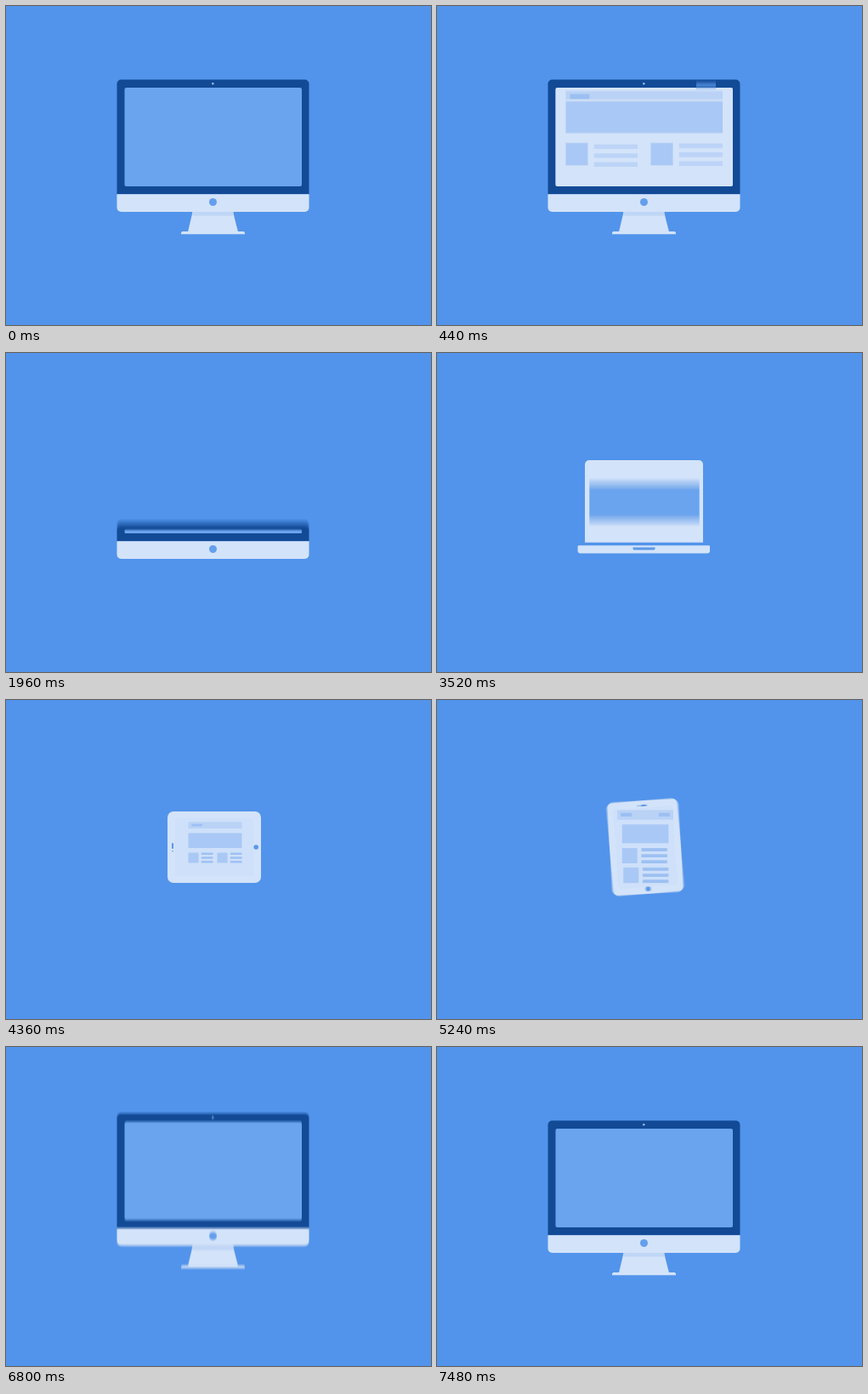
These frames come from a looping animation (500 px wide and 375 px high, 7560 ms). An HTML page with a canvas:

```html
<!DOCTYPE html>
<html lang="en">
<head>
<meta charset="utf-8">
<title>Responsive devices</title>
<style>
html, body { margin: 0; width: 100%; height: 100%; overflow: hidden; background: #5294eb; }
canvas { display: block; width: 500px; height: 375px; }
</style>
</head>
<body>
<canvas id="stage" width="500" height="375"></canvas>
<script>
const LOOP = 7560, STEP = 40, SHUTTER = 24, SAMPLES = 12;
const BG = '#5294eb', SHELL = '#d3e3f9', SCREEN = '#6ba4ee', PAPER = '#cee0fa', BEZEL = '#124a96';
const BLOCK = '#a9c8f5', BAR = '#b9d2f6', LINE = '#bcd4f7', MARK = '#9cc0f2', DOT = '#5b98e8';

const out = document.getElementById('stage').getContext('2d');
const layer = document.createElement('canvas');
layer.width = 500;
layer.height = 375;
const g = layer.getContext('2d');

// Timing
const inOut = n => p => p < .5 ? Math.pow(2 * p, n) / 2 : 1 - Math.pow(2 - 2 * p, n) / 2;
const easeIn = n => p => Math.pow(p, n);
const easeOut = n => p => 1 - Math.pow(1 - p, n);
const lerp = (a, b, p) => a + (b - a) * p;
const span = (t, from, to, ease = inOut(3)) => ease(Math.min(1, Math.max(0, (t - from) / (to - from))));

// Rectangles
const rect = (x, y, w, h) => ({ x, y, w, h });
const around = (cx, cy, w, h) => rect(cx - w / 2, cy - h / 2, w, h);
const inset = (r, dx, dy) => rect(r.x + dx, r.y + dy, r.w - 2 * dx, r.h - 2 * dy);
const shift = (r, dy) => ({ ...r, y: r.y + dy });
const squash = (r, p) => inset(r, 0, r.h / 2 * (1 - p));
const mix = (a, b, p) => rect(lerp(a.x, b.x, p), lerp(a.y, b.y, p), lerp(a.w, b.w, p), lerp(a.h, b.h, p));

function box(r, color, radius = 0, alpha = 1) {
  if (r.w <= 0 || r.h <= 0 || alpha <= 0) return;
  g.globalAlpha = alpha;
  g.fillStyle = color;
  g.beginPath();
  g.roundRect(r.x, r.y, r.w, r.h, radius);
  g.fill();
  g.globalAlpha = 1;
}

const dot = (x, y, r, color, alpha) => box(around(x, y, 2 * r, 2 * r), color, r, alpha);

function lines(r, color, alpha) {
  for (let i = 0; i < 3; i++) box(rect(r.x, r.y + r.h * .4 * i, r.w, r.h * .2), color, 0, alpha);
}

// A page is a bar, a hero and two cells, each a square thumbnail beside text.
function layout({ x, y, w, bar, hero, gap, thumb, space = gap, pitch = 0, bleed = 0 }) {
  const heroY = y + bar + space;
  const cellY = heroY + hero + gap;
  const textX = thumb * 1.28;
  const page = {
    bar: rect(x - bleed, y, w + 2 * bleed, bar),
    hero: rect(x, heroY, w, hero)
  };
  for (let i = 0; i < 2; i++) {
    const cx = x + pitch * i;
    const cy = pitch ? cellY : cellY + (thumb + gap) * i;
    page['thumb' + i] = rect(cx, cy, thumb, thumb);
    page['text' + i] = rect(cx + textX, cy, w - pitch - textX, thumb);
  }
  return page;
}

function mixPages(a, b, p) {
  return Object.fromEntries(Object.keys(a).map(k => [k, mix(a[k], b[k], p)]));
}

const DESKTOP_PAGE = layout({ x: 151.5, y: 104.5, w: 184.5, bar: 9.5, space: 2.5, hero: 37, gap: 9.5, thumb: 26, pitch: 100 });
const TABLET_PAGE = layout({ x: 214.5, y: 143.5, w: 63, bar: 7.5, hero: 17.5, gap: 5.5, thumb: 12, pitch: 34 });
const PORTRAIT_PAGE = layout({ x: 218, y: 129, w: 54, bar: 11, hero: 22, gap: 6, thumb: 18, bleed: 6 });
const PHONE_PAGE = layout({ x: 232.3, y: 162, w: 25, bar: 6.5, hero: 13, gap: 3.5, thumb: 10.5, bleed: 3 });

function drawPage(page, alpha, narrow) {
  const { bar, hero } = page;
  const label = rect(bar.x + bar.w * .06, bar.y + bar.h * .3, bar.w * .2, bar.h * .36);
  box(bar, BAR, 0, alpha);
  box(label, MARK, 0, alpha);
  box({ ...label, x: bar.x + bar.w * .74 }, MARK, 0, alpha * narrow);
  box(hero, BLOCK, 0, alpha);
  for (let i = 0; i < 2; i++) {
    box(page['thumb' + i], BLOCK, 0, alpha);
    lines(page['text' + i], MARK, alpha);
  }
}

// Desktop computer
const CHIN = rect(130.5, 221.3, 226, 20.7);
const GLASS = rect(139.5, 96, 208.5, 116);
const BASE = around(243.3, 230.9, 155.4, 9.4);
const NOTCH = around(243.5, 230, 26, 3);

function stand(dy) {
  g.save();
  g.translate(0, dy);
  g.fillStyle = SHELL;
  g.beginPath();
  g.moveTo(220.5, 238);
  g.lineTo(266, 238);
  g.lineTo(273, 265.5);
  g.lineTo(214, 265.5);
  g.fill();
  box(around(243.5, 244, 48, 5), '#bfd6f6');
  box(around(243.5, 266.7, 75, 3.3), SHELL, [2, 2, 0, 0]);
  g.restore();
}

function desktopPage(t) {
  const close = span(t, 1320, 1600);
  const sheet = squash(GLASS, span(t, 40, 320) * (1 - close));
  if (t < 40 || close === 1) return;
  box(sheet, SHELL, 2);

  g.save();
  if (close > 0) {
    g.beginPath();
    g.rect(sheet.x, sheet.y, sheet.w, sheet.h);
    g.clip();
  }
  const drop = (r, start) => shift(r, -260 * (1 - span(t, start, start + 500, easeOut(5))));
  const { bar, hero } = DESKTOP_PAGE;
  for (let i = 0; i < 2; i++) {
    lines(drop(DESKTOP_PAGE['text' + i], 50 + 60 * i), LINE);
    box(drop(DESKTOP_PAGE['thumb' + i], 125), BLOCK);
  }
  box(drop(hero, 160), BLOCK);
  box(drop(bar, 160), BAR);
  const label = around(168, bar.y + 3.5, 23, 5.5);
  box(drop(label, 120), MARK);
  box(drop({ ...label, x: 305 }, 222), DOT, 0, lerp(.9, .4, span(t, 440, 640)));
  g.restore();
}

function desktop(t) {
  const fold = span(t, 1600, 2010, easeIn(1.3));
  const top = lerp(86.5, CHIN.y, fold);
  const p = span(t, 2080, 2440);
  if (t < 1680) stand(-28 * span(t, 1400, 1640));
  if (fold < 1) {
    box(rect(CHIN.x, top, CHIN.w, CHIN.y - top), BEZEL, [5, 5, 0, 0]);
    dot(243.3, top + 4.7, 1.2, '#9dbfe9', 1 - 4 * fold);
    const left = GLASS.h * (1 - span(t, 1560, 2040, inOut(2.4)));
    box(rect(GLASS.x, GLASS.y + GLASS.h - left, GLASS.w, left), SCREEN, Math.min(2, left / 4));
  }
  const foot = lerp(5, 3, p);
  box(mix(CHIN, BASE, p), SHELL, [p, p, foot, foot]);
  box(mix(around(243.5, 230.5, 9, 9), NOTCH, p), p > 0 ? DOT : '#649fec', lerp(4.5, 1.4, p));
  desktopPage(t);
}

// Laptop
const LID = rect(174, 126, 139, 96.8);
const LID_SCREEN = rect(179.3, 131, 129.4, 89);

function laptop(t) {
  const rise = LID.h * span(t, 2880, 3300, inOut(4));
  box(rect(LID.x, LID.y + LID.h - rise, LID.w, rise), SHELL, [5, 5, 0, 0]);
  box(squash(LID_SCREEN, span(t, 3320, 3724, inOut(6))), SCREEN);
  box(BASE, SHELL, [1, 1, 3, 3]);
  box(NOTCH, DOT, [0, 0, 1.4, 1.4]);
}

// Tablet
const TABLET = around(245, 173, 110, 84);

function tablet(t) {
  const p = span(t, 4000, 4360);
  const alpha = span(t, 4160, 4360);
  const turn = span(t, 4960, 5320);
  if (p < 1) {
    box(mix(BASE, around(245, 209, 106, 9), p), SHELL, 3);
    box(NOTCH, DOT, 1, 1 - p * 4);
  }
  g.save();
  g.translate(245, 173);
  g.rotate(turn * Math.PI / 2);
  g.translate(-245, -173);
  box(mix(LID, TABLET, p), SHELL, lerp(5, 7, p));
  const view = mix(LID_SCREEN, inset(TABLET, 9, 8), p);
  box(view, SCREEN, 0, 1 - p);
  box(view, PAPER, 0, p);
  box(around(196, 171.5, 2, 7), DOT, 1, alpha);
  dot(196, 177.8, .8, DOT, alpha);
  dot(294.2, 173, 2.8, DOT, alpha);
  g.restore();
  drawPage(mixPages(TABLET_PAGE, PORTRAIT_PAGE, turn), alpha, turn);
}

// Phone
const PORTRAIT = around(245, 173, 84, 110);
const PHONE = around(245.1, 189.8, 37.7, 76.5);

function phone(t) {
  const p = span(t, 5520, 6160, inOut(4));
  g.save();
  g.translate(0, 240 * span(t, 6280, 6640, easeIn(3)));
  const body = mix(PORTRAIT, PHONE, p);
  box(body, SHELL, lerp(7, 4.5, p));
  box(inset(body, lerp(8, 3, p), lerp(9, 10, p)), PAPER);
  const y = body.y + 4.8;
  box(around(246, y, 8, 1.6), DOT, .8);
  dot(240, y, .8, DOT);
  dot(245, 222.4, 2.8, DOT);
  drawPage(mixPages(PORTRAIT_PAGE, PHONE_PAGE, p), 1, 1);
  g.restore();
}

function scene(t) {
  g.fillStyle = BG;
  g.fillRect(0, 0, 500, 375);
  if (t < 2880) return desktop(t);
  if (t < 4000) return laptop(t);
  if (t < 5520) return tablet(t);
  phone(t);
  g.save();
  g.translate(0, -275 * (1 - span(t, 6520, 7000, easeOut(4))));
  desktop(0);
  g.restore();
}

// Average several moments around each step for motion blur.
function draw(now) {
  const t = Math.floor((now % LOOP) / STEP) * STEP;
  for (let i = 0; i < SAMPLES; i++) {
    scene(Math.max(0, t + SHUTTER * (i / (SAMPLES - 1) - .5)));
    out.globalAlpha = 1 / (i + 1);
    out.drawImage(layer, 0, 0);
  }
}

let start;
function tick(now) {
  if (start === undefined) start = now;
  draw(now - start);
  requestAnimationFrame(tick);
}
draw(0);
requestAnimationFrame(tick);
</script>
</body>
</html>
```
